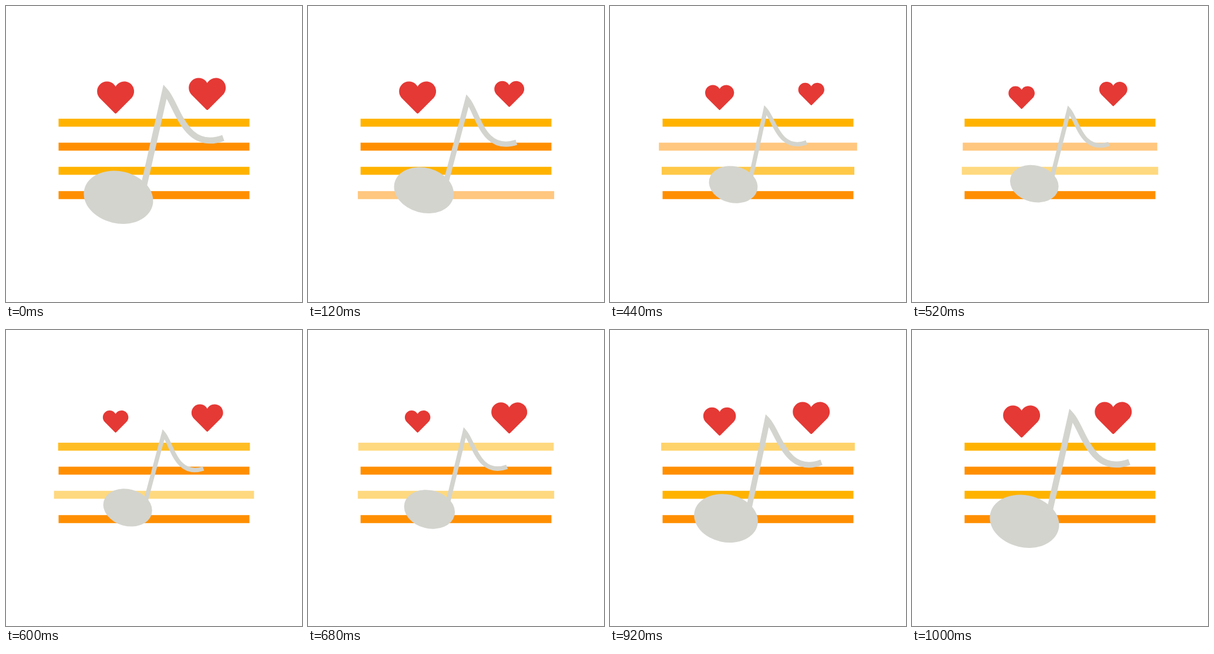
An HTML page with a canvas that plays this animation: 504x504 px, repeating every 1.04 s.

```html
<!DOCTYPE html>
<html lang="en">
<head>
<meta charset="utf-8">
<title>Love song</title>
<style>
html, body { margin: 0; width: 100%; height: 100%; overflow: hidden; background: #fff; }
canvas { display: block; width: 504px; height: 504px; }
</style>
</head>
<body>
<canvas id="stage" width="504" height="504"></canvas>
<script>
const ctx = document.getElementById('stage').getContext('2d');
const LOOP = 1040;
const YELLOW = '#ffb300', ORANGE = '#ff8f00', RED = '#e53935', GREY = '#d3d4ce';

const bars = [
  { y: 198.7, color: YELLOW, start: 580 },
  { y: 239.5, color: ORANGE, start: 200 },
  { y: 280.6, color: YELLOW, start: 400 },
  { y: 322, color: ORANGE, start: 0 }
];
const hearts = [
  { x: 186.6, y: 156, start: 300 },
  { x: 342.7, y: 150, start: 0 }
];
// time, degrees
const tilt = [
  [0, 0], [120, 2.1], [180, 2.2], [280, 0.6], [370, -1], [440, -0.45],
  [530, 1.6], [600, 2.25], [700, 0.4], [800, -1.5], [900, -1.1], [1000, 0], [1040, 0]
];

// Quick shrink, short rest, slow return
function pulse(u) {
  if (u <= 0 || u >= 1) return 0;
  if (u < 0.4) return Math.sin(Math.PI / 2 * u / 0.4);
  if (u < 0.545) return 1;
  return Math.cos(Math.PI / 2 * (u - 0.545) / 0.455);
}

// Smooth curve through the keys
function sample(keys, t) {
  const last = keys.length - 1;
  let i = 0;
  while (i < last - 1 && t >= keys[i + 1][0]) i++;
  const slope = k => {
    const a = keys[Math.max(k - 1, 0)], b = keys[Math.min(k + 1, last)];
    return (b[1] - a[1]) / (b[0] - a[0]);
  };
  const [t0, v0] = keys[i], [t1, v1] = keys[i + 1];
  const d = t1 - t0, u = (t - t0) / d, w = 1 - u;
  return w * w * (1 + 2 * u) * v0 + u * u * (3 - 2 * u) * v1
    + d * u * w * (w * slope(i) - u * slope(i + 1));
}

function drawBar(bar, t) {
  const u = Math.max(0, 1 - Math.abs(t - bar.start - 200) / 200);
  const w = 325 * (1 + 0.048 * u);
  ctx.globalAlpha = 1 - 0.5 * Math.min(1, u * 2.8);
  ctx.fillStyle = bar.color;
  ctx.fillRect(252 - w / 2, bar.y - 6.8, w, 13.6);
  ctx.globalAlpha = 1;
}

function drawHeart(heart, t) {
  const s = 1 - 0.31 * pulse((t - heart.start) / 700);
  const r = 16.8, dx = 14.7, dy = -10.7, k = r * Math.SQRT1_2;
  const notch = Math.atan2(Math.sqrt(r * r - dx * dx), dx);
  ctx.save();
  ctx.translate(heart.x, heart.y);
  ctx.scale(s, s);
  ctx.beginPath();
  ctx.arc(-dx, dy, r, Math.PI * 0.75, Math.PI * 2 - notch);
  ctx.arc(dx, dy, r, Math.PI + notch, Math.PI * 2.25);
  ctx.arcTo(0, 27.8, -dx - k, dy + k, 2);
  ctx.closePath();
  ctx.fillStyle = RED;
  ctx.fill();
  ctx.restore();
}

function drawNote(t) {
  const s = 1 - 0.298 * pulse(t / 1000);
  ctx.save();
  ctx.translate(252, 252);
  ctx.rotate(sample(tilt, t) * Math.PI / 180);
  ctx.scale(s, s);
  ctx.translate(-252, -252);
  ctx.fillStyle = ctx.strokeStyle = GREY;
  ctx.beginPath();
  ctx.ellipse(191.5, 325.7, 59.7, 44.3, 0.225, 0, Math.PI * 2);
  ctx.fill();
  ctx.lineWidth = 10.5;
  ctx.lineJoin = 'miter';
  ctx.beginPath();
  ctx.moveTo(233.2, 313);
  ctx.lineTo(271, 145);
  ctx.bezierCurveTo(292, 168, 304, 248.7, 370, 224.7);
  ctx.stroke();
  ctx.restore();
}

function draw(t) {
  ctx.fillStyle = '#fff';
  ctx.fillRect(0, 0, 504, 504);
  bars.forEach(bar => drawBar(bar, t));
  hearts.forEach(heart => drawHeart(heart, t));
  drawNote(t);
}

const begin = performance.now();
function tick() {
  const t = (performance.now() - begin) % LOOP;
  draw(Math.floor(t / 40) * 40);
  requestAnimationFrame(tick);
}
tick();
</script>
</body>
</html>
```
